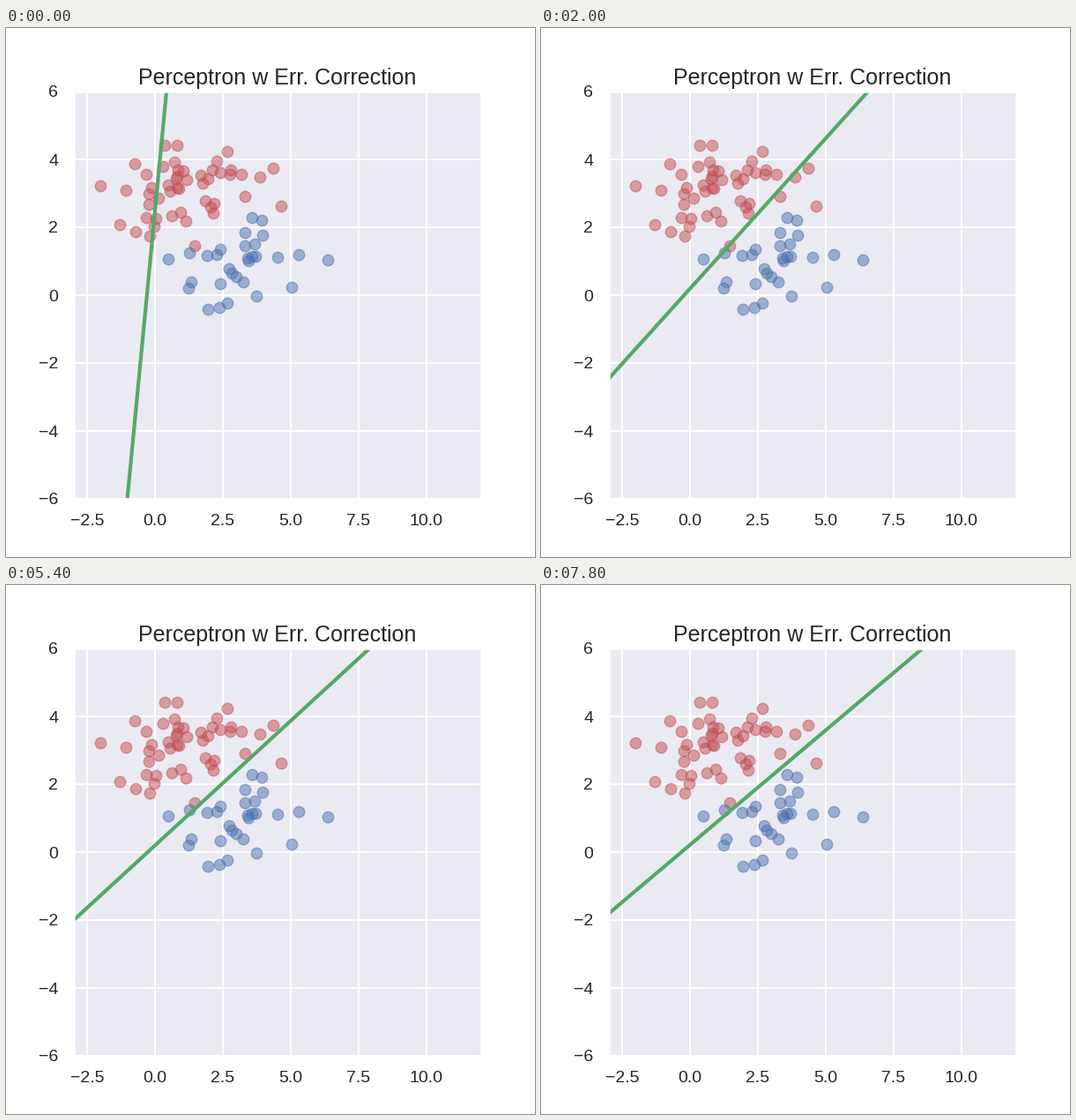
A matplotlib script for the animation above (8000 ms loop, 600 by 600 pixels).

```python
import numpy as np
import matplotlib.pyplot as plt
from matplotlib.animation import FuncAnimation

FRAMES, INTERVAL = 40, 200
RED, BLUE, GREEN = "#C44E52", "#4C72B0", "#55A868"
BACK, INK = "#EAEAF2", "#262626"

reds = np.array([
    (-2.02, 3.21), (-1.08, 3.09), (-1.28, 2.07), (-.72, 1.87), (-.75, 3.86),
    (-.31, 3.55), (-.14, 3.18), (-.22, 2.99), (-.21, 2.67), (-.33, 2.28),
    (-.20, 1.73), (.05, 2.25), (-.04, 2.02), (.14, 2.87), (.29, 3.79),
    (.35, 4.41), (.80, 4.41), (.73, 3.91), (.84, 3.68), (1.03, 3.65),
    (.80, 3.51), (.79, 3.42), (1.18, 3.40), (.48, 3.24), (.81, 3.17),
    (.88, 3.14), (.57, 3.06), (.61, 2.33), (.96, 2.43), (1.13, 2.18),
    (1.45, 1.45), (1.68, 3.52), (1.77, 3.30), (1.96, 3.43), (2.10, 3.69),
    (2.26, 3.94), (2.68, 4.23), (2.42, 3.60), (2.75, 3.55), (2.78, 3.68),
    (3.17, 3.57), (1.84, 2.79), (2.17, 2.69), (2.04, 2.59), (2.13, 2.41),
    (3.33, 2.90), (3.88, 3.47), (4.37, 3.73), (4.66, 2.62),
])
blues = np.array([
    (.50, 1.06), (1.28, 1.24), (1.93, 1.16), (2.26, 1.19), (2.39, 1.34),
    (1.32, .38), (1.25, .20), (2.42, .35), (2.72, .78), (2.82, .66),
    (2.98, .54), (3.24, .38), (3.75, -.03), (2.68, -.23), (2.36, -.37),
    (1.96, -.42), (3.56, 2.28), (3.92, 2.20), (3.33, 1.84), (3.95, 1.76),
    (3.33, 1.45), (3.66, 1.50), (3.40, 1.08), (3.43, 1.01), (3.58, 1.13),
    (3.69, 1.14), (4.53, 1.11), (5.31, 1.19), (6.37, 1.04), (5.05, .23),
])


def augment(pts):
    return np.column_stack([pts, np.ones(len(pts))])


def train(steps):
    """Batch perceptron: add every misclassified sample to the weights."""
    samples = np.vstack([augment(reds), -augment(blues)])
    w = np.array([-915.0, 110.0, -270.0])
    history = [w]
    for _ in range(steps - 1):
        w = w + samples[samples @ w < 0].sum(axis=0)
        history.append(w)
    return history


weights = train(FRAMES)

plt.rcParams["font.family"] = "Liberation Sans"
fig, ax = plt.subplots(figsize=(6, 6), dpi=100, facecolor="white")
ax.set(xlim=(-3, 12), ylim=(-6, 6), facecolor=BACK, axisbelow=True)
ax.set_box_aspect(1)
ax.set_xticks(np.arange(-2.5, 10.1, 2.5))
ax.set_yticks(range(-6, 7, 2))
ax.grid(color="white", linewidth=1.5)
ax.tick_params(length=0, pad=12.5, labelsize=14, labelcolor=INK)
for spine in ax.spines.values():
    spine.set(color="white", linewidth=1.875)
ax.set_title("Perceptron w Err. Correction", fontsize=18, color=INK, pad=6)

for pts, color in ((reds, RED), (blues, BLUE)):
    ax.plot(*pts.T, "o", color=color, alpha=0.5, markersize=9)

xs = np.array([-3.0, 12.0])
boundary, = ax.plot([], [], color=GREEN, linewidth=3)


def update(frame):
    a, b, c = weights[frame]
    boundary.set_data(xs, -(a * xs + c) / b)
    return boundary,


anim = FuncAnimation(fig, update, frames=FRAMES, interval=INTERVAL,
                     init_func=lambda: update(0), repeat=True, repeat_delay=0)
plt.show()
```
